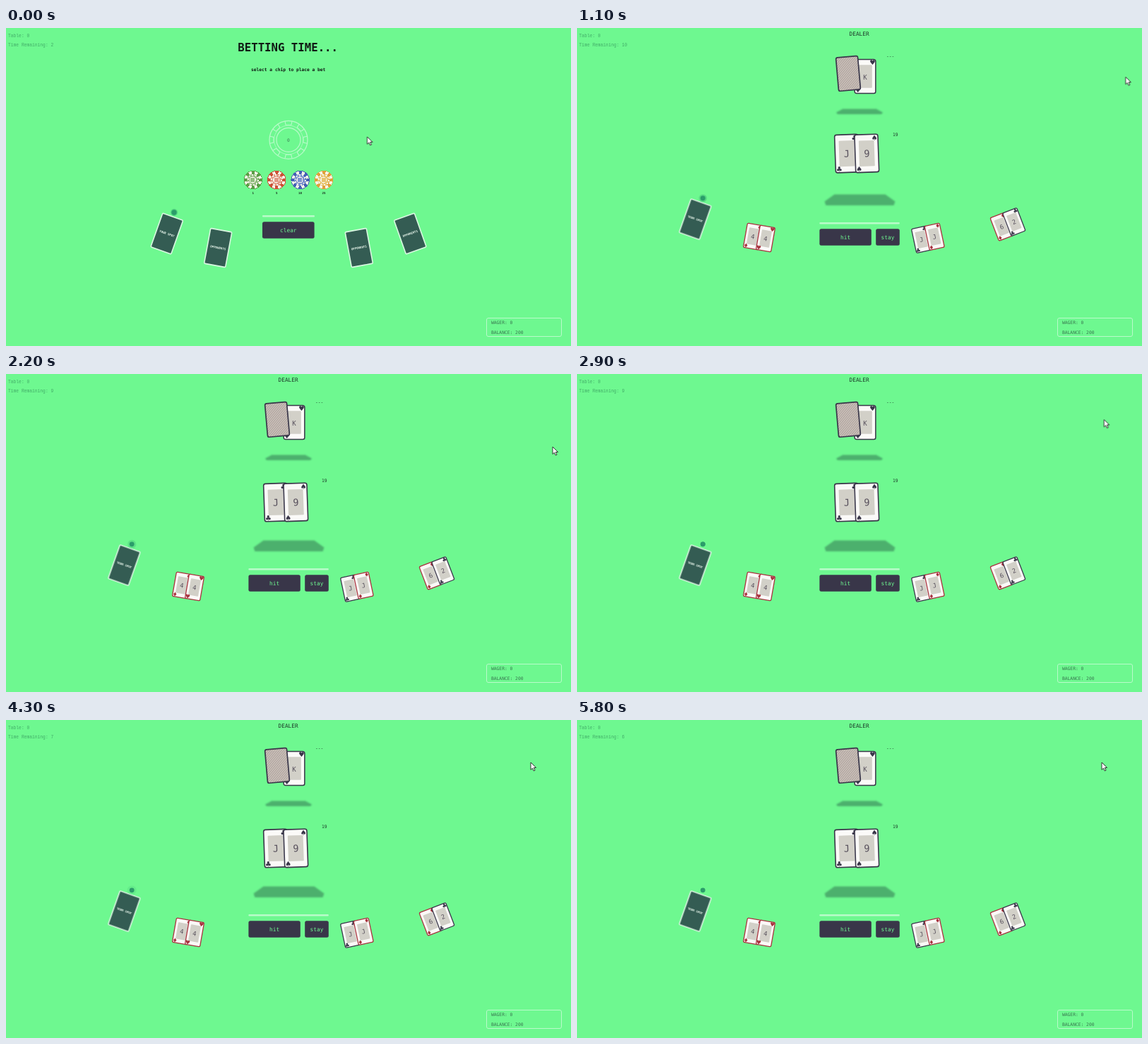
Write an HTML page that moves like this. It is 800 by 450 pixels and loops after 5.9 s.

```html
<!DOCTYPE html>
<html lang="en">
<head>
<meta charset="utf-8">
<title>Card table</title>
<style>
  html, body { margin: 0; width: 100%; height: 100%; overflow: hidden; background: #6ef890; }
  svg { display: block; width: 100vw; height: 100vh; }
  text { font-family: "DejaVu Sans Mono", "Liberation Mono", monospace; white-space: pre; }
  .suit { font-family: "DejaVu Sans", sans-serif; }
  .light { font-family: "Liberation Mono", monospace; }

  #bet, #play, #cursor, .ping, .settle { animation: 5.9s infinite; }
  #bet { animation-name: bet; animation-timing-function: step-end; }
  #play { animation-name: play; animation-timing-function: step-end; }
  #cursor { animation-name: cursor; animation-timing-function: linear; }
  .settle { animation-name: settle; animation-timing-function: ease-out; }
  .ping {
    animation: ping 1s -.1s cubic-bezier(0, 0, .2, 1) infinite;
    transform-box: fill-box; transform-origin: center;
  }

  /* the deal comes at 1100 ms */
  @keyframes bet { 0% { visibility: visible } 18.644%, 100% { visibility: hidden } }
  @keyframes play { 0% { visibility: hidden } 18.644%, 100% { visibility: visible } }
  @keyframes settle {
    0%, 18.644% { transform: translateY(-4px) }
    23.73% { transform: translateY(-1px) }
    30%, 100% { transform: none }
  }
  @keyframes ping { 75%, 100% { transform: scale(2); opacity: 0 } }
  @keyframes cursor {
    0% { transform: translate(511px, 154px) }
    5.08% { transform: translate(625px, 122px) }
    10.17% { transform: translate(709px, 88px) }
    13.56%, 15.2% { transform: translate(731px, 76px) }
    20.34%, 23.73% { transform: translate(799px, 66px) }
    30.5% { transform: translate(779px, 98px) }
    35%, 42% { transform: translate(774px, 103px) }
    50%, 100% { transform: translate(743px, 60px) }
  }
</style>
</head>
<body>
<svg id="stage" viewBox="0 0 800 450" preserveAspectRatio="none">
  <defs>
    <pattern id="hatch" width="2.4" height="2.4" patternUnits="userSpaceOnUse" patternTransform="rotate(-45)">
      <rect width="2.4" height="2.4" fill="#cfc5bd"/>
      <rect width="2.4" height="1" fill="#a79c98"/>
    </pattern>
    <filter id="blur" x="-20%" y="-60%" width="140%" height="220%"><feGaussianBlur stdDeviation="1.1"/></filter>
  </defs>
  <rect width="800" height="450" fill="#6ef890"/>
  <g id="hud"></g>
  <g id="bet"></g>
  <g id="play"></g>
  <g id="cursor">
    <path d="M0 0V10.4L2.5 8.2L4.2 12L6 11.2L4.3 7.5H7.6Z" fill="#fff" stroke="#222" stroke-width=".9"/>
  </g>
</svg>
<script>
const LOOP = 5900, DARK = '#393649', RED = '#a8323e', GREEN = '#6ef890', PALE = '#b9fbca';
const $ = id => document.getElementById(id);

const text = (x, y, size, fill, str, extra = '') =>
  `<text x="${x}" y="${y}" font-size="${size}" fill="${fill}" ${extra}>${str}</text>`;
const mid = (x, y, size, fill, str, extra = '') =>
  text(x, y, size, fill, str, `text-anchor="middle" ${extra}`);
const box = (x, y, w, h, r, fill, extra = '') =>
  `<rect x="${x}" y="${y}" width="${w}" height="${h}" rx="${r}" fill="${fill}" ${extra}/>`;
const ring = (r, stroke, width, extra = '') =>
  `<circle r="${r}" fill="none" stroke="${stroke}" stroke-width="${width}" ${extra}/>`;
const place = (x, y, turn, body) =>
  `<g transform="translate(${x} ${y}) rotate(${turn})">${body}</g>`;

const button = (x, y, w, label) =>
  box(x, y, w, 23.5, 2.5, DARK) + mid(x + w / 2, y + 15, 7.8, GREEN, label);
const bar = (x, y, w) => box(x, y, w, 2.4, 1, PALE);

const seat = (x, y, turn, label) => place(x, y, turn,
  box(-15.3, -25.3, 30.6, 50.6, 1.5, '#345c53', 'stroke="#d9f8e1" stroke-width="1.6"') +
  mid(0, 1.4, 4.1, '#eefbf1', label, 'font-weight="bold"'));

const dot = (x, y) =>
  `<circle class="ping" cx="${x}" cy="${y}" r="3.4" fill="#2b9c6a"/>` +
  `<circle cx="${x}" cy="${y}" r="3.4" fill="#2b9c6a"/>`;

// Card face, drawn at scale s of the large 33 x 54 card.
function card(x, y, turn, s, rank, suit, color = DARK) {
  const w = 33 * s, h = 53.5 * s, glyph = 4 + 6 * s;
  const mark = (px, py) => mid(px, py + glyph * .36, glyph, color, suit, 'class="suit"');
  return place(x, y, turn,
    box(-w / 2, -h / 2, w, h, 2.4 * s + .4, '#fbfaf8', `stroke="${color}" stroke-width="${.7 + .9 * s}"`) +
    box(-w * .33, -h * .34, w * .66, h * .68, 1, '#d2d0c8') +
    mid(0, 4.9 * s, 13.5 * s, '#57505c', rank) +
    mark(-w / 2 + 5 * s, h / 2 - 5 * s) + mark(w / 2 - 5 * s, -h / 2 + 5 * s));
}

const shadow = (x, y, w, h) => {
  const a = w / 2, b = w * .36;
  return `<path d="M${x - b} ${y}H${x + b}L${x + a} ${y + h * .65}L${x + a - 2} ${y + h}` +
    `H${x - a + 2}L${x - a} ${y + h * .65}Z" fill="#2f6b4b" fill-opacity=".5" filter="url(#blur)"/>`;
};

function chipOutline(x, y) {
  let tabs = '';
  for (let a = 0; a < 360; a += 45)
    tabs += `<path d="M-5 -26.2L-3.8 -21H3.8L5 -26.2" fill="none" stroke="${PALE}" stroke-width="1.1" transform="rotate(${a})"/>`;
  return place(x, y, 0, ring(27, PALE, 1.2) + ring(20.5, PALE, .7) + ring(17, PALE, 1.2) +
    tabs + mid(0, 2.4, 6.3, '#3b7c56', '0'));
}

function chip(x, color, pale, value) {
  const turn = Math.PI * 2;
  const dashes = (r, n) => `stroke-dasharray="${r * turn / n / 2}"`;
  return place(x, 215, 0,
    `<g shape-rendering="crispEdges"><circle r="13.2" fill="${color}"/>` +
    ring(10.4, '#f7f4e9', 4, dashes(10.4, 8) + ' transform="rotate(11)"') +
    `<circle cx="-.6" r="8.2" fill="${pale}"/>` +
    ring(7.2, '#f7f4e9', 1.8, dashes(7.2, 10)) +
    `<circle cx="-.6" r="4.6" fill="#f7f4e9"/><rect x="-3.4" y="-3" width="6" height="6" fill="${pale}"/></g>` +
    mid(0, 20.2, 4.2, '#17301f', value, 'font-weight="bold"'));
}

$('hud').innerHTML =
  text(3, 12.6, 6.3, '#43ad68', 'Table: 0', 'class="light"') +
  text(3, 25.8, 6.3, '#43ad68', '', 'class="light" id="timer"') +
  box(680.5, 410.5, 106, 26, 2.5, 'none', `stroke="${PALE}" stroke-width="1"`) +
  text(687, 419.4, 6.3, '#38754f', 'WAGER: 0') +
  text(687, 432.6, 6.3, '#38754f', 'BALANCE: 200');

$('bet').innerHTML =
  text(328.3, 33, 15.7, '#101a14', 'BETTING TIME...', 'font-weight="bold"') +
  mid(399.7, 61, 6.25, '#101a14', 'select a chip to place a bet', 'font-weight="bold"') +
  chipOutline(400, 158.3) +
  chip(349.8, '#5b9d45', '#93bd80', 1) + chip(383.2, '#cc5136', '#e29a86', 5) +
  chip(416.6, '#4560b4', '#7f93d0', 10) + chip(450, '#dfa03a', '#e8c470', 25) +
  bar(363, 265, 74) + button(363, 274.2, 73.6, 'clear') +
  seat(227.8, 291, 19.5, 'YOUR SPOT') + seat(300.2, 311, 10.5, 'OPPONENTS') +
  seat(499.8, 311, -10.5, 'OPPONENTS') + seat(572.3, 291, -19.5, 'OPPONENTS') +
  dot(238, 261);

const hands =
  card(382, 181.6, -2, 1, 'J', '♣') + card(410.3, 181.4, -2, 1, '9', '♠') +
  card(249, 299, 10, .65, '4', '♦', RED) + card(267, 302, 10, .65, '4', '♥', RED) +
  card(487.6, 303.2, -12, .65, 'J', '♣') + card(506.2, 299.2, -12, .65, 'J', '♦', RED) +
  card(601.2, 285.2, -21, .65, '6', '♦', RED) + card(618.8, 278.4, -21, .65, '2', '♣');

$('play').innerHTML =
  mid(399.6, 10.9, 7.8, '#1d3a2a', 'DEALER') +
  text(438, 42.4, 6.3, '#1d3a2a', '---') + text(447, 152.8, 6.3, '#1d3a2a', '19') +
  shadow(400, 114.5, 66, 7.5) + shadow(400.5, 235.5, 100, 15.5) +
  card(408, 68.5, 0, .9, 'K', '♥').replace('font-size="12.15"', 'font-size="9"') +
  place(384, 64.4, -5, box(-15.5, -23.8, 31, 47.6, 2.4, 'url(#hatch)', `stroke="${DARK}" stroke-width="1.7"`)) +
  `<g class="settle">${hands}</g>` +
  bar(343.4, 275, 113.4) + button(343.4, 284.2, 73.4, 'hit') + button(423.2, 284.2, 33.6, 'stay') +
  seat(167.4, 270.6, 19.5, 'YOUR SPOT') + dot(178.2, 240.8);

// One tick per second, the first at 100 ms.
const counts = [2, 1, 10, 9, 8, 7, 6];
function frame(now) {
  const tick = Math.floor((now % LOOP + 900) / 1000);
  const label = 'Time Remaining: ' + counts[tick];
  if ($('timer').textContent !== label) $('timer').textContent = label;
  requestAnimationFrame(t => frame(t - start));
}
const start = performance.now();
frame(0);
</script>
</body>
</html>
```
